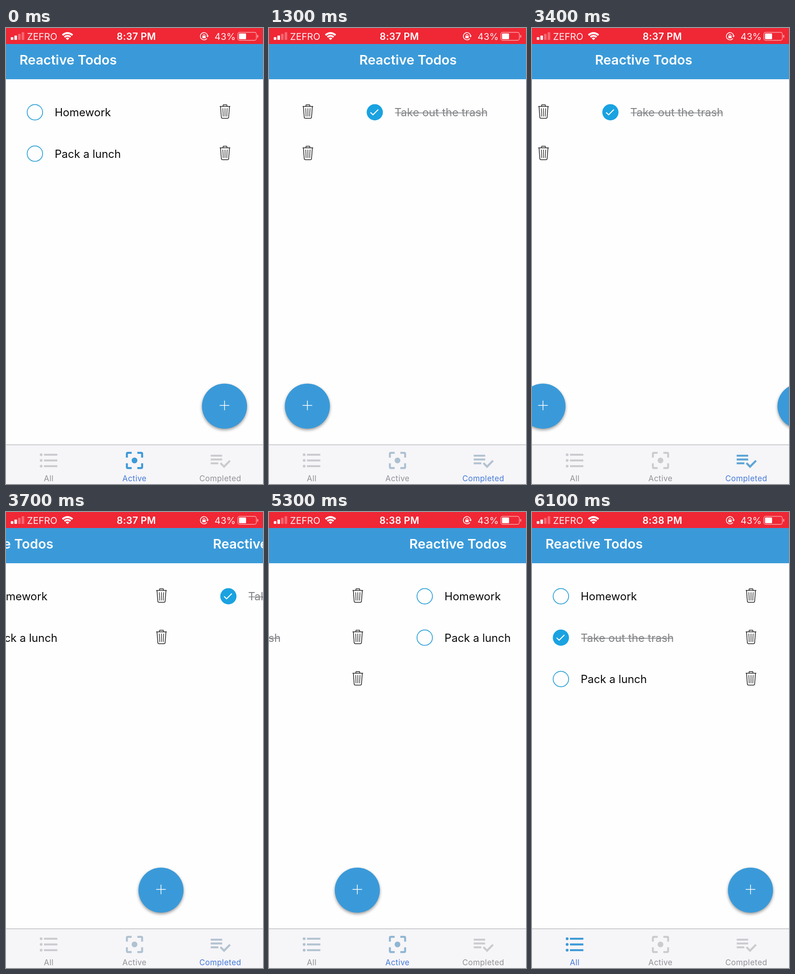
An HTML page with a canvas for the animation above (8 s loop, 562x997 px).

```html
<!DOCTYPE html>
<html lang="en">
<head>
<meta charset="utf-8">
<title>Todo tabs</title>
<style>
html, body { margin: 0; width: 100%; height: 100%; overflow: hidden; background: #fefefe; }
canvas { display: block; width: 562px; height: 997px; }
</style>
</head>
<body>
<canvas id="stage" width="562" height="997"></canvas>
<script>
const W = 562, H = 997, LOOP = 8000, STEP = 100;
const BLUE = '#3a9ad9', RED = '#f02735', GREY = '#cbcbcf';
const FONT = 'Inter, Roboto, "Liberation Sans", sans-serif';
const ctx = document.getElementById('stage').getContext('2d');

const HOMEWORK = { text: 'Homework' };
const TRASH = { text: 'Take out the trash', done: true };
const LUNCH = { text: 'Pack a lunch' };
const PAGES = [[HOMEWORK, TRASH, LUNCH], [HOMEWORK, LUNCH], [TRASH]];

// Swipes between pages; a and b shape the easing, lag delays the new tab's tint
const SWIPES = [
  { from: 1, to: 2, start: 800, a: 1.88, b: 3, lag: 300, label: 1300 },
  { from: 2, to: 1, start: 3100, a: 2.436, b: 3, lag: 300, label: 3800 },
  { from: 1, to: 0, start: 5000, a: 1.689, b: 4, lag: 150, label: 5400 }
];
const SWIPE_TIME = 900;

const ICON_SCALE = 25 / 12;
const TABS = [
  { name: 'All', x: 93.5, icon: drawList },
  { name: 'Active', x: 281, icon: drawFocus },
  { name: 'Completed', x: 468.5, icon: drawPlaylist }
];

function progress(s, t) {
  const u = Math.min(1, Math.max(0, (t - s.start) / SWIPE_TIME));
  return 1 - Math.pow(1 - Math.pow(u, s.a), s.b);
}

function text(str, x, y, size, color, weight = 400, align = 'left', spacing = 0) {
  ctx.font = `${weight} ${size}px ${FONT}`;
  ctx.letterSpacing = spacing + 'px';
  ctx.textAlign = align;
  ctx.fillStyle = color;
  ctx.fillText(str, x, y);
}

function rect(x, y, w, h, color) {
  ctx.fillStyle = color;
  ctx.fillRect(x, y, w, h);
}

function disc(x, y, r, color) {
  ctx.fillStyle = color;
  ctx.beginPath();
  ctx.arc(x, y, r, 0, Math.PI * 2);
  ctx.fill();
}

function stroke(color, width) {
  ctx.strokeStyle = color;
  ctx.lineWidth = width;
  ctx.stroke();
}

function line(color, width, ...pts) {
  ctx.beginPath();
  for (let i = 0; i < pts.length; i += 2) ctx.lineTo(pts[i], pts[i + 1]);
  stroke(color, width);
}

function drawStatus(clock) {
  rect(0, 0, W, 35, RED);
  for (let i = 0; i < 4; i++) {
    const h = 6 + i * 3.6;
    ctx.fillStyle = i < 2 ? '#fff' : 'rgba(255,255,255,.3)';
    ctx.beginPath();
    ctx.roundRect(10.5 + i * 7.9, 26 - h, 5.6, h, 1);
    ctx.fill();
  }
  text('ZEFRO', 46, 25.5, 20.5, 'rgba(255,255,255,.93)');
  drawWifi(134.5, 26.5);
  text(clock, 285, 25.5, 21, '#fff', 600, 'center', 0.3);
  drawLock(433, 18);
  text('43%', 456, 25.5, 20.5, 'rgba(255,255,255,.93)');
  drawBattery();
}

function drawWifi(x, y) {
  const a = -Math.PI * 0.75, b = -Math.PI * 0.25;
  ctx.fillStyle = '#fff';
  for (const [inner, outer] of [[0, 5.6], [7.4, 11.2], [13.2, 17.4]]) {
    ctx.beginPath();
    ctx.arc(x, y, outer, a, b);
    ctx.arc(x, y, inner, b, a, true);
    ctx.fill();
  }
}

function drawLock(x, y) {
  ctx.beginPath();
  ctx.arc(x, y, 8, Math.PI * 0.2, Math.PI * 1.96);
  stroke('#fff', 1.6);
  ctx.fillStyle = '#fff';
  ctx.beginPath();
  ctx.moveTo(x + 4.8, y - 1.2);
  ctx.lineTo(x + 10.4, y - 1.2);
  ctx.lineTo(x + 7.8, y + 2.6);
  ctx.fill();
  rect(x - 3.6, y - 0.8, 7.2, 5.2, '#fff');
  ctx.beginPath();
  ctx.arc(x, y - 1.6, 2.3, Math.PI, 0);
  stroke('#fff', 1.4);
}

function drawBattery() {
  ctx.beginPath();
  ctx.roundRect(507, 9.5, 40.5, 17.5, 4);
  stroke('rgba(255,255,255,.6)', 1.4);
  ctx.fillStyle = '#fff';
  ctx.beginPath();
  ctx.roundRect(509.5, 12, 15.5, 12.5, 1.5);
  ctx.fill();
  ctx.fillStyle = 'rgba(255,255,255,.6)';
  ctx.beginPath();
  ctx.roundRect(549.3, 15.2, 2.2, 6, 1);
  ctx.fill();
}

function drawTrash(x, y) {
  const ink = '#1c1c1c';
  ctx.lineJoin = 'round';
  line(ink, 1.5, x - 11.5, y - 11.5, x + 11.5, y - 11.5);
  line(ink, 1.4, x - 4.5, y - 11.5, x - 4, y - 15, x + 4, y - 15, x + 4.5, y - 11.5);
  ctx.beginPath();
  ctx.moveTo(x - 9.8, y - 11.5);
  ctx.lineTo(x - 8, y + 12);
  ctx.quadraticCurveTo(x - 7.7, y + 14.6, x - 5.2, y + 14.6);
  ctx.lineTo(x + 5.2, y + 14.6);
  ctx.quadraticCurveTo(x + 7.7, y + 14.6, x + 8, y + 12);
  ctx.lineTo(x + 9.8, y - 11.5);
  stroke(ink, 1.5);
  for (const d of [-1, 0, 1]) {
    line(ink, 1.3, x + d * 4.7, y - 7.5, x + d * 3.9, y + 10.5);
  }
}

function drawItem(item, y) {
  if (item.done) {
    disc(63.2, y, 17.7, '#1aa2e1');
    line('#fff', 2.2, 53.8, y + 0.3, 59.3, y + 5.6, 70.8, y - 6);
  } else {
    ctx.beginPath();
    ctx.arc(63.2, y, 16.9, 0, Math.PI * 2);
    stroke('#2b9fd6', 1.7);
  }
  text(item.text, 106.5, y + 9, 24, item.done ? '#808285' : '#0a0a0a');
  if (item.done) rect(107.5, y + 0.6, ctx.measureText(item.text).width - 3, 1.6, '#808285');
  drawTrash(478.9, y - 1.2);
}

function drawAdd(x, y) {
  ctx.save();
  ctx.shadowColor = 'rgba(0,0,0,.4)';
  ctx.shadowBlur = 6;
  ctx.shadowOffsetY = 3;
  disc(x, y, 49.3, BLUE);
  ctx.restore();
  line('#fff', 1.5, x - 10.5, y - 1.6, x + 10.5, y - 1.6);
  line('#fff', 1.5, x, y - 12.1, x, y + 8.9);
}

function drawPage(items, x) {
  ctx.save();
  ctx.translate(x, 0);
  text('Reactive Todos', 29.4, 80, 28.8, '#fff', 600);
  items.forEach((item, i) => drawItem(item, 184.2 + i * 90.5));
  drawAdd(477.8, 826.8);
  ctx.restore();
}

// Tab icons on a 24 unit grid
function drawList(color) {
  for (const y of [6, 12, 18]) {
    disc(4, y, 1.45, color);
    rect(7, y - 1, 14, 2, color);
  }
}

function drawFocus(color) {
  for (let i = 0; i < 4; i++) {
    ctx.save();
    ctx.translate(12, 12);
    ctx.rotate(i * Math.PI / 2);
    ctx.beginPath();
    ctx.moveTo(-8, -3);
    ctx.lineTo(-8, -7);
    ctx.quadraticCurveTo(-8, -8, -7, -8);
    ctx.lineTo(-3, -8);
    stroke(color, 2);
    ctx.restore();
  }
  disc(12, 12, 3, color);
}

function drawPlaylist(color) {
  rect(2, 6, 12, 2, color);
  rect(2, 10, 12, 2, color);
  rect(2, 14, 8, 2, color);
  ctx.lineJoin = 'miter';
  line(color, 2.1, 12.25, 14.75, 16, 18.5, 22.25, 12.25);
}

function drawTab(tab, tint, selected) {
  ctx.save();
  ctx.translate(tab.x - 25, 920.5);
  ctx.scale(ICON_SCALE, ICON_SCALE);
  tab.icon(GREY);
  if (tint > 0) {
    ctx.globalAlpha = tint;
    tab.icon(BLUE);
  }
  ctx.restore();
  text(tab.name, tab.x, 991, 17, selected ? '#447ad8' : '#929297', 400, 'center', 0.45);
}

function stateAt(t) {
  const state = { page: 1, selected: 1, tints: [0, 1, 0] };
  for (const s of SWIPES) {
    if (t < s.start) break;
    const p = progress(s, t);
    state.page = s.from + (s.to - s.from) * p;
    state.selected = t < s.label ? s.from : s.to;
    state.tints = [0, 0, 0];
    state.tints[s.from] = Math.pow(1 - p, 1.3);
    state.tints[s.to] = progress(s, t - s.lag);
  }
  return state;
}

function render(t) {
  const { page, selected, tints } = stateAt(t);
  rect(0, 0, W, H, '#fefefe');
  rect(0, 35, W, 77, BLUE);
  PAGES.forEach((items, i) => {
    if (Math.abs(i - page) < 1) drawPage(items, (i - page) * W);
  });
  drawStatus(t < 4100 ? '8:37 PM' : '8:38 PM');
  rect(0, 911, W, 86, '#f6f5f8');
  rect(0, 910.7, W, 1.2, '#adadb2');
  TABS.forEach((tab, i) => drawTab(tab, tints[i], i === selected));
}

const begin = performance.now();
function tick(now) {
  const t = Math.max(0, now - begin) % LOOP;
  render(Math.floor(t / STEP) * STEP);
  requestAnimationFrame(tick);
}
render(0);
requestAnimationFrame(tick);
</script>
</body>
</html>
```
